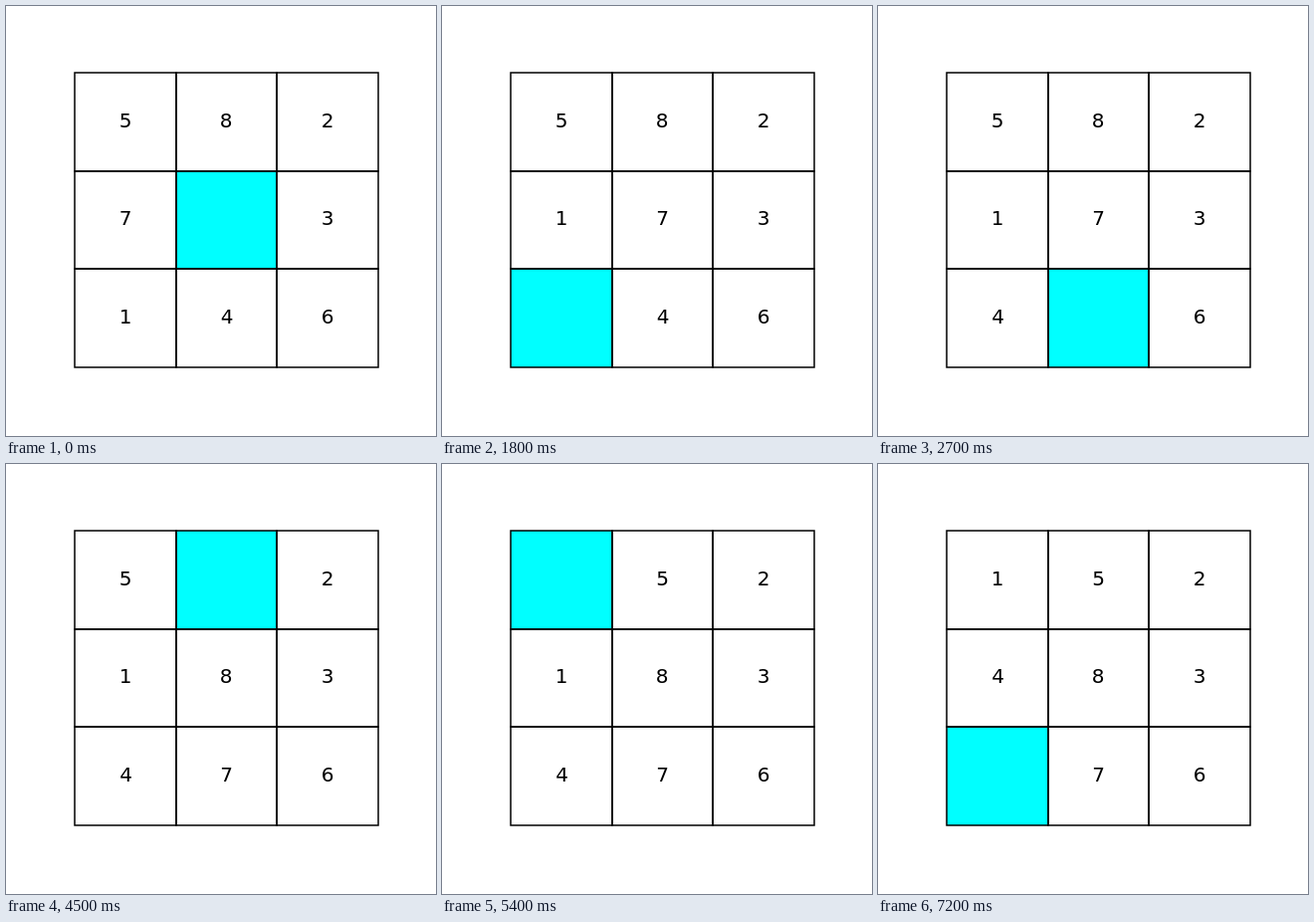
An HTML page for the animation above (8000 ms loop, 432 by 432 pixels).

```html
<!DOCTYPE html>
<html lang="en">
<head>
<meta charset="utf-8">
<title>Sliding puzzle</title>
<style>
  html, body { margin: 0; width: 100%; height: 100%; overflow: hidden; background: #fff; }
  svg { display: block; width: 100vw; height: 100vh; }
  text { font: 20px "DejaVu Sans", sans-serif; text-anchor: middle; }
  .line { fill: none; stroke: #000; stroke-width: 1.5; }
</style>
</head>
<body>
<svg id="stage" viewBox="0 0 432 432"></svg>
<script>
const STEP = 900, LOOP = 8000;
const xs = [69, 171, 272, 374];
const ys = [67, 166, 264, 363];
const baselines = [122, 220, 319];
const nudge = { 4: 0.5, 8: -0.5 };
const start = [5, 8, 2, 7, 0, 3, 1, 4, 6];
const blankPath = [4, 3, 6, 7, 4, 1, 0, 3, 6];

// Each board follows from the last by swapping the blank with a neighbour.
const boards = [start];
for (let i = 1; i < blankPath.length; i++) {
  const next = boards[i - 1].slice();
  next[blankPath[i - 1]] = next[blankPath[i]];
  next[blankPath[i]] = 0;
  boards.push(next);
}

const stage = document.getElementById("stage");
function add(name, attrs) {
  const el = document.createElementNS("http://www.w3.org/2000/svg", name);
  for (const key in attrs) el.setAttribute(key, attrs[key]);
  return stage.appendChild(el);
}
function cellBox(i) {
  const c = i % 3, r = Math.floor(i / 3);
  return { x: xs[c], y: ys[r], width: xs[c + 1] - xs[c], height: ys[r + 1] - ys[r] };
}

const blank = add("rect", { fill: "#00ffff" });
start.forEach((_, i) => add("rect", { ...cellBox(i), class: "line" }));
const labels = start.map((_, i) => add("text", { y: baselines[Math.floor(i / 3)] }));

let shown = -1;
function draw(time) {
  const step = Math.min(Math.floor((time % LOOP) / STEP), boards.length - 1);
  if (step === shown) return;
  shown = step;
  const hole = cellBox(blankPath[step]);
  for (const key in hole) blank.setAttribute(key, hole[key]);
  boards[step].forEach((n, i) => {
    const mid = (xs[i % 3] + xs[i % 3 + 1]) / 2;
    labels[i].setAttribute("x", mid + (nudge[n] || 0));
    labels[i].textContent = n || "";
  });
}

const origin = performance.now();
function tick() {
  draw(performance.now() - origin);
  requestAnimationFrame(tick);
}
tick();
</script>
</body>
</html>
```
